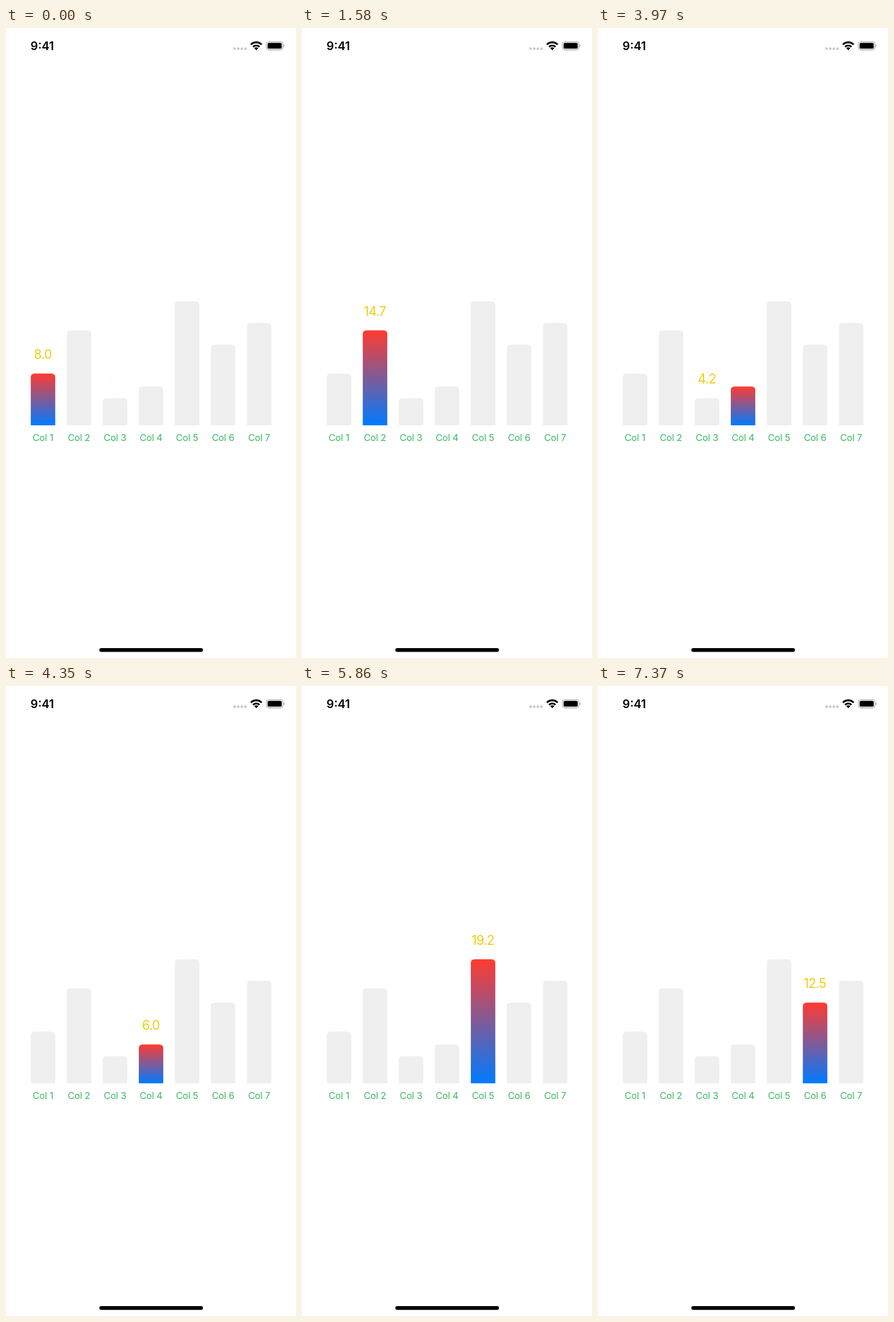
An HTML page for the animation above (8000 ms loop, 500 by 1083 pixels).

```html
<!DOCTYPE html>
<html lang="en">
<head>
<meta charset="utf-8">
<title>Column chart</title>
<style>
  html, body { margin: 0; width: 100%; height: 100%; overflow: hidden; background: #fff; }
  svg { display: block; width: 100%; height: 100%; font-family: Inter, Roboto, sans-serif; text-anchor: middle; }
  .clock { font-size: 20px; font-weight: 600; }
  .label { font-size: 16px; letter-spacing: -.15px; fill: #3cb861; }
  .value { font-size: 22.3px; letter-spacing: -.8px; fill: #f1cd17; }
</style>
</head>
<body>
<svg viewBox="0 0 500 1083">
  <defs>
    <linearGradient id="active" x2="0" y2="1">
      <stop stop-color="#ff3b30"/>
      <stop offset="1" stop-color="#007aff"/>
    </linearGradient>
  </defs>
  <text class="clock" x="62.5" y="38">9:41</text>
  <g fill="#c9c9c9">
    <circle cx="394.2" cy="35.6" r="2.3"/>
    <circle cx="400.4" cy="35.6" r="2.3"/>
    <circle cx="406.6" cy="35.6" r="2.3"/>
    <circle cx="412.8" cy="35.6" r="2.3"/>
  </g>
  <g fill="none" stroke="#000" stroke-width="3.1">
    <path d="M422.2 28.5A13.2 13.2 0 0 1 440.8 28.5"/>
    <path d="M426 32.3A7.8 7.8 0 0 1 437 32.3"/>
  </g>
  <path d="M431.5 38.2L428 34.6A5 5 0 0 1 435 34.6Z"/>
  <rect x="448.9" y="23.5" width="28.6" height="14.2" rx="4.4" fill="none" stroke="#a0a0a0" stroke-width="1.2"/>
  <rect x="451" y="25.6" width="24.4" height="10" rx="2.6"/>
  <path d="M479 28.3Q482 30.6 479 32.9Z" fill="#a0a0a0"/>
  <g id="chart"></g>
  <rect x="161" y="1066" width="178.5" height="6.6" rx="3.3"/>
</svg>
<script>
const LOOP = 8000, BASE = 683, UNIT = 11.11, WIDTH = 42.2, PITCH = 62.1, LEFT = 42.7, RADIUS = 6.7;
const values = [8, 14.7, 4.2, 6, 19.2, 12.5, 15.85];

// Each tap recolours its column at once and cross-fades the value in five equal steps.
const taps = [
  { start: -320, end: 50, from: 2, to: 0, lead: .5 },
  { start: 1200, end: 1580, from: 0, to: 1, lead: 0 },
  { start: 2620, end: 2970, from: 1, to: 2, lead: .21 },
  { start: 3970, end: 4350, from: 2, to: 3, lead: 0 },
  { start: 5510, end: 5860, from: 3, to: 4, lead: 0 },
  { start: 7010, end: 7370, from: 4, to: 5, lead: .12 }
];

const chart = document.getElementById('chart');

function add(tag, attributes, text = '') {
  const node = document.createElementNS(chart.namespaceURI, tag);
  for (const name in attributes) node.setAttribute(name, attributes[name]);
  node.textContent = text;
  return chart.appendChild(node);
}

const columns = values.map((value, i) => {
  const x = LEFT + i * PITCH, center = x + WIDTH / 2, top = BASE - value * UNIT;
  const bar = add('path', {
    d: `M${x} ${BASE}V${top + RADIUS}q0 ${-RADIUS} ${RADIUS} ${-RADIUS}` +
       `h${WIDTH - 2 * RADIUS}q${RADIUS} 0 ${RADIUS} ${RADIUS}V${BASE}Z`
  });
  add('text', { class: 'label', x: center, y: 709.8 }, `Col ${i + 1}`);
  const number = add('text', { class: 'value', x: center - .4, y: top - 25 }, value.toFixed(1));
  return { bar, number };
});

const ease = x => x * x * (3 - 2 * x);

function draw(time) {
  const tap = taps.filter(t => t.start <= time).pop();
  const step = Math.min(5, Math.floor((time - tap.start) / (tap.end - tap.start) * 5 + 1e-6));
  const shown = ease(tap.lead + (1 - tap.lead) * step / 5);
  columns.forEach(({ bar, number }, i) => {
    bar.setAttribute('fill', i === tap.to ? 'url(#active)' : '#efefef');
    number.setAttribute('opacity', i === tap.to ? shown : i === tap.from ? 1 - shown : 0);
  });
}

const origin = performance.now();
function frame() {
  draw((performance.now() - origin) % LOOP);
  requestAnimationFrame(frame);
}
frame();
</script>
</body>
</html>
```
